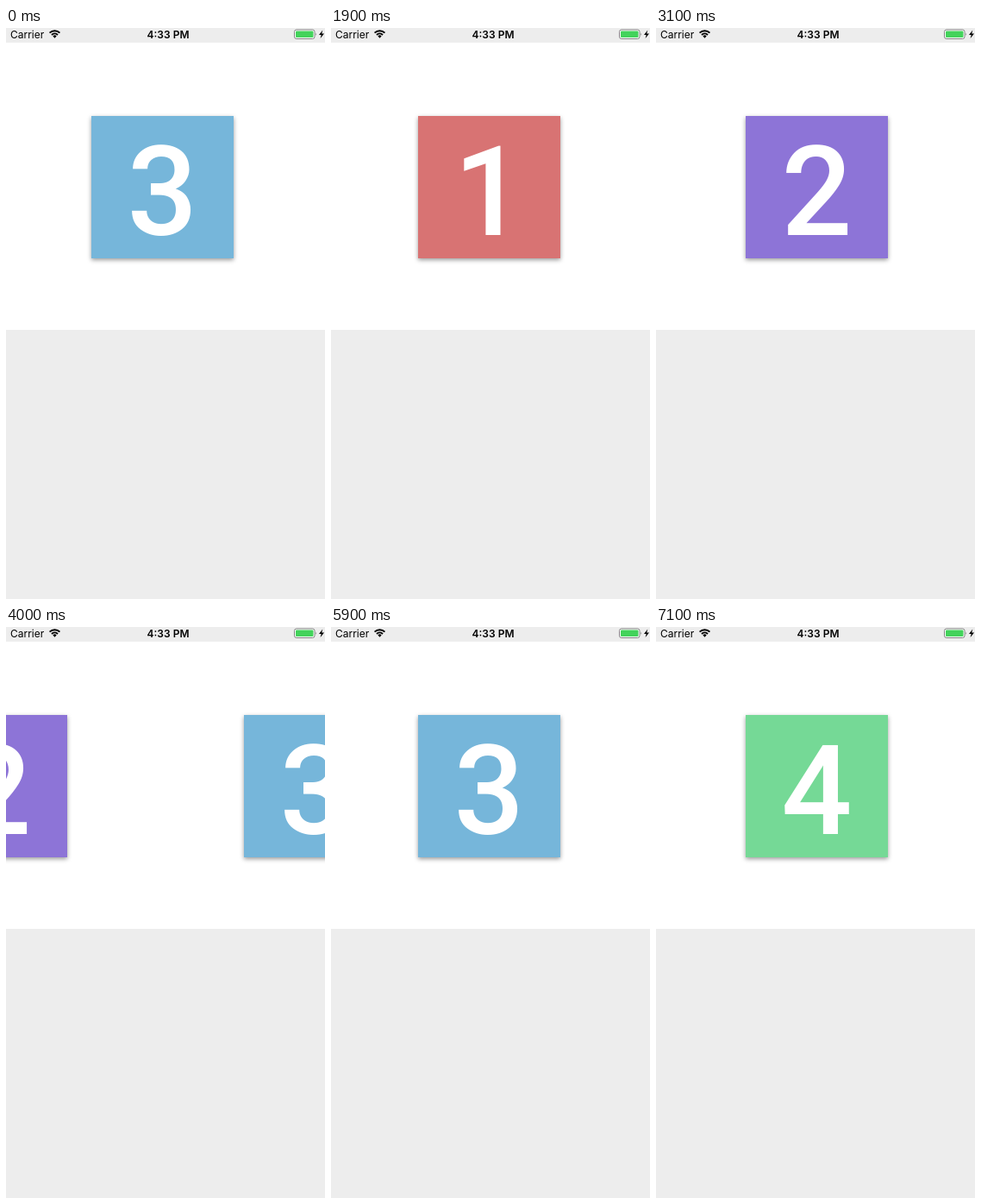
These frames come from a looping animation (370x662 px, 7300 ms). An HTML page:

```html
<!DOCTYPE html>
<html lang="en">
<head>
<meta charset="utf-8">
<title>Card carousel</title>
<style>
  html, body { margin: 0; width: 100%; height: 100%; overflow: hidden; background: #ededed; }
  #stage { position: relative; width: 370px; height: 662px; overflow: hidden; background: #ededed; }
  #pager { position: absolute; top: 17px; width: 370px; height: 333px; overflow: hidden; background: #fff; }
  .card {
    position: absolute; left: 104px; top: 85px; width: 165px; height: 164.5px;
    box-shadow: 0 2px 5px rgba(0, 0, 0, .4);
  }
  .card svg { display: block; width: 100%; height: 100%; }
  .card text { font: 500 144px Roboto, sans-serif; fill: #fff; text-anchor: middle; }
  #status { position: absolute; left: 0; top: 0; }
  #status text { font: 400 12px Inter, sans-serif; fill: #000; }
  #status .clock { font-weight: 600; text-anchor: middle; }
</style>
</head>
<body>
<div id="stage">
  <div id="pager"></div>
  <svg id="status" width="370" height="17">
    <text x="5" y="11.5">Carrier</text>
    <g fill="none" stroke="#000" stroke-width="2">
      <path d="M50.6 5.6A8.3 8.3 0 0 1 62.4 5.6"/>
      <path d="M53 8A5 5 0 0 1 60 8"/>
    </g>
    <path d="M56.5 11.7L54.4 9.4A3 3 0 0 1 58.6 9.4Z"/>
    <text class="clock" x="188" y="11.5">4:33 PM</text>
    <rect x="334.5" y="2" width="23.5" height="10.5" rx="2.4" fill="#fff" stroke="#777" stroke-width=".9"/>
    <rect x="336" y="3.5" width="20.5" height="7.5" rx="1" fill="#43d35b"/>
    <path d="M359.3 5.4Q360.9 7.2 359.3 9.1Z" fill="#777"/>
    <path d="M367.3 2.4L363 7.9H365.7L364.6 12L369 6.4H366.2Z"/>
  </svg>
</div>
<script>
  const LOOP = 7300, TICK = 100, PAGE = 370, SLIDE = 212;
  const colors = ['#d87373', '#8d74d7', '#76b6da', '#75d996'];

  // Each slide: start time, outgoing card, incoming card.
  const slides = [
    [-14, 3, 1],
    [1889, 1, 2],
    [3889, 2, 3],
    [5889, 3, 4]
  ];

  const pager = document.getElementById('pager');
  const cards = colors.map((color, i) => {
    const card = document.createElement('div');
    card.className = 'card';
    card.style.background = color;
    card.innerHTML = `<svg><text x="82.5" y="137.5">${i + 1}</text></svg>`;
    pager.append(card);
    return card;
  });

  const ease = p => p * p * (3 - 2 * p);

  function render(now) {
    const t = Math.floor((now % LOOP) / TICK) * TICK;
    const [start, from, to] = slides.filter(s => s[0] <= t).pop();
    const shift = Math.round(PAGE * ease(Math.min(1, (t - start) / SLIDE)));
    cards.forEach((card, i) => {
      const n = i + 1;
      const x = n === to ? PAGE - shift : -shift;
      card.style.display = n === from || n === to ? 'block' : 'none';
      card.style.transform = `translateX(${x}px)`;
    });
  }

  const origin = performance.now();
  function frame() {
    render(performance.now() - origin);
    requestAnimationFrame(frame);
  }
  frame();
</script>
</body>
</html>
```
